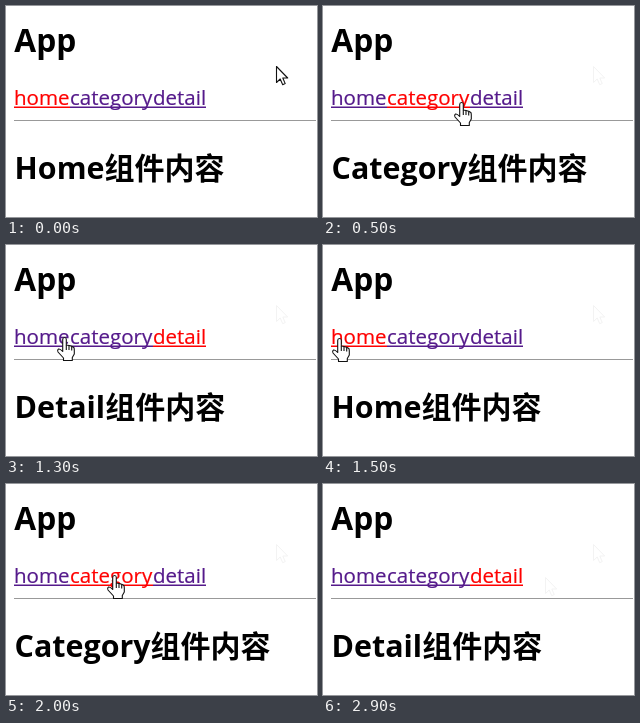
Animation of 311 by 211 pixels, one loop 3100 ms. Source, as an HTML page:

```html
<!DOCTYPE html>
<html lang="zh">
<head>
<meta charset="utf-8">
<style>
html, body { margin: 0; width: 100%; height: 100%; overflow: hidden; background: #fff; }
svg { display: block; }
text { font-family: "Open Sans", "Noto Sans", sans-serif; }
.head { font-weight: 700; font-size: 30.4px; }
.cjk { font-family: "Noto Sans CJK SC", "Noto Sans CJK", sans-serif; font-size: 30px; }
.link { font-size: 20.5px; stroke-width: .2px; }
</style>
</head>
<body>
<svg width="311" height="211" viewBox="0 0 311 211">
  <defs>
    <path id="arrow" d="M.5 .5V16.5L4.2 13L6.7 18.7L9.2 17.6L6.8 12H11.7Z"/>
    <g id="hand">
      <path d="M-2.3 13.5V1.5Q-2.3 -.5 -.5 -.5T1.3 1.5V7L4 7.5L6.7 8.2L8.8 9.5Q9.3 10 9.3 12V16L7.3 19.5V22.5H-1.5V20L-7 14Q-8 12 -6.5 11Q-5 10.5 -2.3 13.5Z"/>
      <path d="M1.3 7V12M4 7.5V12M6.7 8.2V12.5" fill="none"/>
    </g>
  </defs>
  <text class="head" x="8.3" y="45.5" style="font-size:31.7px">App</text>
  <g id="links"></g>
  <rect x="8" y="114" width="302" height="1" fill="#999"/>
  <text class="head" x="8.6" y="173"><tspan id="title"></tspan><tspan class="cjk">组件内容</tspan></text>
  <g fill="#fff" stroke="#f3f3f3">
    <use id="trace1" href="#arrow" x="270" y="60"/>
    <use id="trace2" href="#arrow" x="222" y="93"/>
  </g>
  <use id="cursor" fill="#fff" stroke="#111" stroke-width="1.1" stroke-linejoin="round"/>
</svg>
<script>
const LOOP = 3100, STEP = 100, EXIT = 2900;
const NS = "http://www.w3.org/2000/svg";
const $ = id => document.getElementById(id);

const home = { name: "home", x: 8, width: 56 };
const category = { name: "category", x: 64, width: 83 };
const detail = { name: "detail", x: 147, width: 53 };
const pages = [home, category, detail];

// The pointer eases from stop to stop; the page opens on arrival.
const stops = [
  { t: 0, x: 270, y: 60, page: home },
  { t: 500, x: 139, y: 97, page: category },
  { t: 900, x: 178, y: 92, page: detail },
  { t: 1500, x: 17, y: 94, page: home },
  { t: 2000, x: 109, y: 92, page: category },
  { t: 2500, x: 174, y: 94, page: detail },
  { t: 2700, x: 222, y: 93, page: detail },
  { t: EXIT, x: 340, y: 25, page: detail }
];

function add(tag, attrs) {
  const el = document.createElementNS(NS, tag);
  for (const key in attrs) el.setAttribute(key, attrs[key]);
  return $("links").appendChild(el);
}

for (const p of pages) {
  p.label = add("text", { class: "link", x: p.x, y: 99 });
  p.label.textContent = p.name;
  p.line = add("rect", { x: p.x, y: 100.5, width: p.width, height: 1.5 });
}

const show = (el, on) => el.setAttribute("visibility", on ? "visible" : "hidden");

function render(t) {
  const a = stops.filter(s => s.t <= t).pop();
  const b = stops[stops.indexOf(a) + 1] || a;
  const u = b === a ? 0 : (t - a.t) / (b.t - a.t);
  const ease = u * u * (3 - 2 * u);
  const x = Math.round(a.x + (b.x - a.x) * ease);
  const y = Math.round(a.y + (b.y - a.y) * ease);

  for (const p of pages) {
    const color = p === a.page ? "#ff0000" : "#551a8b";
    p.label.setAttribute("fill", color);
    p.label.setAttribute("stroke", color);
    p.line.setAttribute("fill", color);
  }
  $("title").textContent = a.page.name[0].toUpperCase() + a.page.name.slice(1);

  const over = x >= 8 && x < 200 && y > 82 && y < 104;
  const cursor = $("cursor");
  cursor.setAttribute("href", over ? "#hand" : "#arrow");
  cursor.setAttribute("x", x);
  cursor.setAttribute("y", y);
  show(cursor, t < EXIT);
  show($("trace1"), t >= STEP);
  show($("trace2"), t >= EXIT - STEP);
}

const start = performance.now();
function tick() {
  const t = (performance.now() - start) % LOOP;
  render(Math.floor(t / STEP) * STEP);
  requestAnimationFrame(tick);
}
tick();
</script>
</body>
</html>
```
